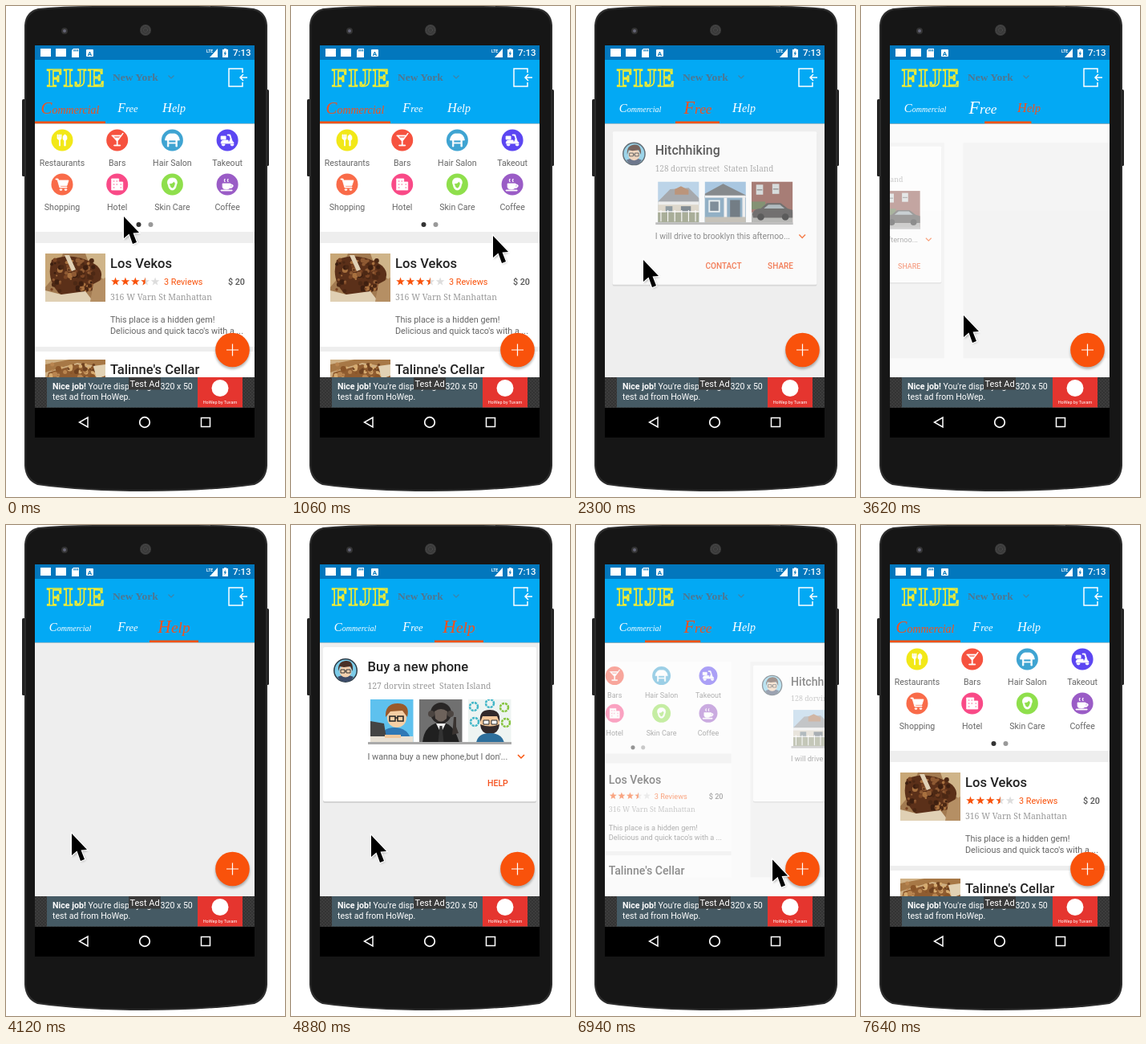
An HTML page that plays this animation: 348 px wide and 611 px high, repeating every 8680 ms.

```html
<!DOCTYPE html>
<html lang="en">
<head>
<meta charset="utf-8">
<style>
html, body { margin: 0; width: 100%; height: 100%; overflow: hidden; background: #fff; }
#stage { display: block; width: 348px; height: 611px; }
text { font-family: Roboto, sans-serif; font-size: 10.8px; white-space: pre; }
.title { font-size: 16.6px; font-weight: 500; fill: #222; }
.addr { font-family: "Noto Serif", serif; font-size: 10.4px; fill: #999; }
.body { fill: #666; }
.btn { font-size: 10.5px; font-weight: 500; fill: #f4511e; }
.cat { font-size: 10.6px; fill: #666; text-anchor: middle; }
.tab { font-family: "Liberation Serif", serif; font-style: italic; text-anchor: middle; }
.ad { font-size: 10.6px; fill: #fff; }
.line { fill: none; stroke: #fff; stroke-width: 1.2; }
.icon { fill: #fff; fill-rule: evenodd; stroke: #fff; stroke-width: .8; }
</style>
</head>
<body>
<svg id="stage" viewBox="0 0 348 611"></svg>
<script>
const ORANGE = '#f9520b';
const LEFT = 36, W = 274, TOP = 146.5, BOTTOM = 462, H = BOTTOM - TOP;
const stage = document.getElementById('stage');
const rect = (x, y, w, h, fill, more = '') =>
  `<rect x="${x}" y="${y}" width="${w}" height="${h}" fill="${fill}" ${more}/>`;
const band = (y, h, fill, more) => rect(LEFT, y, W, h, fill, more);
const circle = (x, y, r, fill, more = '') =>
  `<circle cx="${x}" cy="${y}" r="${r}" fill="${fill}" ${more}/>`;
const path = (d, fill, more = '') => `<path d="${d}" fill="${fill}" ${more}/>`;
const line = (d, more = '') => `<path d="${d}" class="line" ${more}/>`;
const text = (x, y, str, cls = '', more = '') =>
  `<text x="${x}" y="${y}" class="${cls}" ${more}>${str}</text>`;
const photo = (x, y, w, h, art) =>
  `<svg x="${x}" y="${y}" width="${w}" height="${h}">${art}</svg>`;

// ---- phone and bars ----
const phone =
  rect(20, 116, 5, 96, '#222', 'rx="1.5"') + rect(323, 104, 5, 95, '#222', 'rx="1.5"') +
  path('M23 24Q24 7 40 3Q70 0 110 0H238Q280 0 309 3Q325 7 326 24V572Q325 590 310 596' +
    'Q250 604 174 604T39 596Q24 590 23 572Z', '#2c2c2c') +
  path('M25 25Q26 9 41 5Q70 2 110 2H238Q280 2 308 5Q323 9 324 25V571Q323 588 309 594' +
    'Q250 602 174 602T40 594Q26 588 25 571Z', '#161616') +
  circle(174, 30, 7, '#3a3a3a') +
  circle(174, 30, 5.5, 'none', 'stroke="#555" stroke-dasharray="1 1"') +
  circle(174, 30, 2.5, 'none', 'stroke="#555" stroke-dasharray="1 1"') +
  circle(73, 31, 4, '#333') + circle(73, 31, 2, '#667');

const statusBar = band(49, 18, '#0277bd') +
  rect(43, 53, 13, 10, '#fff') + rect(62, 53, 13, 10, '#fff') +
  path('M84 53h7v11h-9v-9z', '#fff') + line('M85 54v2.5M87.2 54v2.5M89.4 54v2.5', 'style="stroke:#0277bd"') +
  rect(100, 54, 9, 9, '#fff', 'rx="1"') +
  text(104.5, 61.5, 'A', '', 'text-anchor="middle" style="font-size:8px;font-weight:700" fill="#0277bd"') +
  text(250, 57.5, 'LTE', '', 'fill="#fff" style="font-size:5px;font-weight:700"') +
  path('M254 64L264 53V64Z', '#fff') +
  path('M270 54h2v-1h3v1h2v10h-7z', '#fff') + path('M274 55.5l-2.5 4h1.5l-.5 3 2.5-4h-1.5z', '#0277bd') +
  text(283, 62, '7:13', '', 'fill="#fff" style="font-size:11.5px;font-weight:500"');

const appBar = band(67, TOP - 67, '#03a9f4') +
  text(51, 100, 'FIJE', '', `fill="#03a9f4" stroke="#f1ec34" stroke-width="1.7"
    style="font:bold 31px 'Liberation Serif',serif;letter-spacing:1.5px"`) +
  text(133, 93, 'New York', '', `fill="#4f7690"
    style="font:bold 13.5px 'Liberation Serif',serif"`) +
  path('M202.5 86.5l3.5 3.5 3.5-3.5', 'none', 'stroke="#3f83a8" stroke-width="1.2"') +
  line('M295 83V78H278V100H295V95M301 89H292M296 85l-4 4 4 4', 'style="stroke-width:1.5"');

const tabs = [
  { x: 80, left: 36, right: 124, first: 'C', rest: 'ommercial', size: [15, 10] },
  { x: 152, left: 124, right: 179, first: 'F', rest: 'ree', size: [16, 12.5] },
  { x: 209.5, left: 179, right: 240, first: 'H', rest: 'elp', size: [16.5, 14] }
];
const tabBar = tabs.map((t, i) => `<g id="tab${i}">` +
  text(t.x, 132, `<tspan font-size="${t.size[0]}">${t.first}</tspan><tspan font-size="${t.size[1]}">${t.rest}</tspan>`, 'tab') +
  '</g>').join('') + `<rect id="ink" y="143.5" height="3" fill="${ORANGE}"/>`;

// ---- first page ----
const cats = [
  ['Restaurants', '#f2e818', 'M-6-7h1v4h1v-4h1v4h1v-4h1v5l-1.5 2V7h-1V0L-6-2ZM3.5-7Q6.5-6 6-2Q5.500 0 4.200.5V7h-1.400V.5Q1.500 0 1-2Q.5-6 3.500-7Z'],
  ['Bars', '#f6523f', 'M-7-6H5L7-9 7.500-8.500 5.500-5.500.5 1V6H4V7H-4V6H-.5V1ZM-4.500-5L-3-3H2.500L4-5Z'],
  ['Hair Salon', '#3fa4d2', 'M-9 0Q-8-7-3-8H3Q8-7 9 0ZM-6 0h1.500V3h9V0H6V8H4.500V4h-9V8H-6Z'],
  ['Takeout', '#5c46f2', 'M-8-5h6v4h-6ZM-8 4Q-8 0-4 0H1V2H2.500L4-2 2.500-6H0V-7H3.500L6 1Q8 2 8 4H2.500ZM-7 5a2 2 0 1 0 4 0ZM4 5a2 2 0 1 0 4 0Z'],
  ['Shopping', '#f96b49', 'M-8-7h3l.6 2H8L6 1.500H-2.500L-2 3H6V4H-3L-6-6H-8ZM-3 6a1.400 1.400 0 1 0 3 0ZM3 6a1.400 1.400 0 1 0 3 0Z'],
  ['Hotel', '#f94a87', 'M-7 7V-7H2V-3H7V7ZM-5-5v2h2v-2ZM-1.500-5v2h2v-2ZM-5-1v2h2v-2ZM-1.500-1v2h2v-2ZM3.500-1v2h2v-2ZM-5 3v2h2v-2ZM3.500 3v2h2v-2Z'],
  ['Skin Care', '#8fdf4c', 'M-6-2Q-6-8 0-8T6-2L5 1Q4 7 0 7T-5 1ZM-4-1Q1-1 2-4L4-1 3 2Q2 5 0 5T-3 2Z'],
  ['Coffee', '#9a5cc6', 'M-6-1H4V0Q8 0 7 2.500T3 4.500Q1.500 6-1 6Q-6 6-6 3ZM4 1V3Q6 3 6 1ZM-8 7H6V8H-8ZM-3-3q-2-2 0-4q-1 2 0 4ZM1-3q-2-2 0-4q-1 2 0 4Z']
].map(([name, color, d], i) => {
  const x = 70 + 68.7 * (i % 4), y = i < 4 ? 167 : 222;
  return circle(x, y, 13.5, color) + `<path d="${d}" class="icon" transform="translate(${x} ${y})"/>` +
    text(x, y + 32, name, 'cat');
}).join('');

const starPoints = Array.from({ length: 10 }, (_, i) => {
  const r = i % 2 ? 2.3 : 5.6, a = i * Math.PI / 5;
  return `${(r * Math.sin(a)).toFixed(2)},${(-r * Math.cos(a)).toFixed(2)}`;
});
const star = (x, fill, pts = starPoints) =>
  `<polygon points="${pts.join(' ')}" transform="translate(${x} 343)" fill="${fill}"/>`;
const stars = [0, 1, 2, 3, 4].map(i => star(136.5 + 12.4 * i, i < 3 ? ORANGE : '#ddd')).join('') +
  star(173.7, ORANGE, [...starPoints.slice(5), starPoints[0]]);

// small seeded flecks of food inside a box
function flecks(count, x, y, w, h, colors) {
  let seed = 7;
  const rnd = () => (seed = seed * 16807 % 2147483647) / 2147483647;
  return Array.from({ length: count }, () =>
    circle((x + w * rnd()).toFixed(1), (y + h * rnd()).toFixed(1), (1 + 2.5 * rnd()).toFixed(1),
      colors[Math.floor(rnd() * colors.length)])).join('');
}
const tacoArt = rect(0, 0, 75, 60, '#a27a50') + path('M0 0H22L10 30 0 42Z', '#c8a777') +
  path('M50 0H75V34L58 22Z', '#cfb489') + path('M8 8Q30-2 56 10T60 46L20 52Q0 34 8 8Z', '#5b3019') +
  flecks(90, 8, 8, 52, 40, ['#3d1f10', '#7a4524', '#8f5a33', '#4c2814', '#a8713f']) +
  path('M24 2l6 0 8 18-5 2ZM0 46l20 5 30-4 10 13H0Z', '#e0d0b4') + path('M60 38l15-8V60H56Z', '#b58f64');
const cellarArt = rect(0, 0, 75, 60, '#cfb084') + path('M0 6L30 0H75V10L40 4 0 16Z', '#a77846') +
  path('M4 16L40 6 75 18V30H0Z', '#8f5c30') +
  flecks(50, 4, 6, 62, 18, ['#b98550', '#6f4220', '#d6ab70', '#8a5528']) + path('M60 8l15-2V20L64 24Z', '#e2d2b4');

const commercial = band(TOP, H, '#fff') + cats +
  circle(165.5, 272, 3, '#333') + circle(180.5, 272, 3, '#999') +
  band(281, 14, '#eee') + photo(49, 308, 75, 60, tacoArt) +
  text(130, 325.5, 'Los Vekos', 'title') + stars +
  text(197, 347, '3 Reviews', '', `fill="${ORANGE}"`) +
  text(298, 347, '$ 20', '', 'text-anchor="end" fill="#555" style="font-weight:500"') +
  text(130, 366, '316 W Varn St Manhattan', 'addr') +
  text(130, 393.5, 'This place is a hidden gem!', 'body') +
  text(130, 408, "Delicious and quick taco's with a ...", 'body') +
  band(424, 6, '#eee') + photo(49, 440, 75, 60, cellarArt) +
  text(130, 457.5, "Talinne's Cellar", 'title');

// ---- card pages ----
const avatar = circle(68, 181, 15, '#2b3a45') + circle(68, 181, 13.5, '#7ccbe8') +
  path('M58 189q10-5 20 0l-3 4q-7 4-14 0Z', '#3c4a68') + circle(68, 182, 7.5, '#f3cfae') +
  path('M59 182Q58 170 68 169T77 182L74 176 66 177 61 176Z', '#4a3026') +
  path('M62 180h5v4h-5zM69 180h5v4h-5zM67 182h2', 'none', 'stroke="#333"');

const house = rect(0, 0, 54, 54, '#a9cbe6') + path('M0 26L16 10 40 8 54 22V30H0Z', '#8b8f94') +
  path('M22 10l8-4 10 5v6H22z', '#a8734f') + rect(0, 29, 54, 17, '#d8d0bf') +
  rect(0, 26, 54, 4, '#eee') + rect(10, 32, 9, 14, '#6b7b83') + rect(30, 32, 13, 10, '#59656e') +
  rect(0, 40, 54, 14, '#8f9578') + line('M0 39H54M4 37V52M13 37V52M22 37V52M31 37V52M40 37V52M49 37V52');
const porch = rect(0, 0, 54, 54, '#8fb9dc') + path('M0 16L24 3 54 18V22H0Z', '#5e6468') +
  rect(0, 19, 54, 35, '#6f98b5') + rect(5, 24, 15, 16, '#e8eef0') + rect(7, 26, 11, 12, '#55697a') +
  rect(25, 21, 4, 33, '#f3f3f3') + rect(33, 24, 13, 30, '#43525d') + rect(49, 20, 4, 34, '#eee') +
  rect(0, 46, 54, 8, '#b7b2a5') + rect(0, 18, 54, 3, '#f0f0f0');
const car = rect(0, 0, 54, 54, '#8c5148') + rect(6, 4, 9, 13, '#cfd5d6') + rect(27, 3, 9, 13, '#cfd5d6') +
  rect(7, 10, 7, 1.5, '#777') + rect(28, 9, 7, 1.5, '#777') + rect(0, 26, 18, 10, '#5b6e45') +
  rect(0, 40, 54, 14, '#a3a3a1') + path('M1 42Q3 35 12 35L20 28H38L47 35 54 37V47H2Z', '#42403f') +
  path('M16 35l6-5h15l6 5z', '#9aa7ad') + circle(12, 46, 4.5, '#222') + circle(44, 46, 4.5, '#222');
const coder = rect(0, 0, 54, 54, '#5ec1ee') + path('M12 54Q12 35 30 35T52 54Z', '#2f78b5') +
  circle(33, 23, 12, '#f5cfa5') + path('M19 22Q18 5 34 5T46 22L40 14 25 15Z', '#9a5a2b') +
  path('M24 21h7v6h-7zM34 21h7v6h-7zM31 23h3', 'none', 'stroke="#222" stroke-width="1.5"') +
  path('M0 27l17 3 3 18H0Z', '#444') + rect(0, 46, 54, 8, '#e7e0d4') + rect(18, 44, 20, 4, '#f1c79b');
const ape = rect(0, 0, 54, 54, '#707070') + path('M4 54Q6 32 24 29T50 54Z', '#202020') +
  path('M21 30l6 12 6-12z', '#eee') + path('M25.5 33h3l2 21h-7z', '#333') +
  circle(27, 17, 13, '#292625') + circle(15, 18, 4, '#4c4541') + circle(39, 18, 4, '#4c4541') +
  path('M19 15Q27 9 35 15L34 24Q27 31 20 24Z', '#6d625b') + path('M42 34l1-12h3v12l3 8-8 2z', '#3a3431');
const ideas = rect(0, 0, 54, 54, '#eef4f2') +
  [[7, 9], [45, 10], [8, 28], [47, 29], [27, 5]].map(([x, y], i) =>
    circle(x, y, 5, 'none', `stroke="${['#43b7c8', '#86c440'][i % 2]}" stroke-width="2.5" stroke-dasharray="3 1"`)).join('') +
  circle(27, 29, 12, '#f3c79a') + path('M15 28Q13 13 27 13T39 28L36 21H18Z', '#32292a') +
  path('M15 31q12 5 24 0Q38 43 27 43T15 31Z', '#32292a') + path('M10 54Q12 42 27 42T45 54Z', '#2d6f9c') +
  path('M19 26h7v5h-7zM29 26h7v5h-7z', '#fff', 'stroke="#222"');

const cardPage = (i, h, title, addr, arts, msg, buttons) => band(TOP, H, '#eee') +
  `<g id="card${i}">` + rect(40, 153, 266, h + 0.8, '#cfcfcf', 'rx="2"') + rect(40, 152, 266, h, '#fff', 'rx="2"') +
  avatar + text(95.5, 182, title, 'title') + text(95.5, 204, addr, 'addr') +
  arts.map((a, k) => photo(99 + 61 * k, 217, 53.5, 53, a)).join('') + rect(96, 270, 179, 3, '#aaa') +
  text(95.5, 292, msg, 'body') +
  path('M283 286l4 4 4-4', 'none', `stroke="${ORANGE}" stroke-width="1.5"`) + buttons + '</g>';

const free = cardPage(1, 199, 'Hitchhiking', '128 dorvin street  Staten Island', [house, porch, car],
  'I will drive to brooklyn this afternoo...',
  text(161, 330.5, 'CONTACT', 'btn') + text(242, 330.5, 'SHARE', 'btn'));
const help = cardPage(2, 192, 'Buy a new phone', '127 dorvin street  Staten Island', [coder, ape, ideas],
  "I wanna buy a new phone,but I don'...", text(245, 324.5, 'HELP', 'btn'));

// ---- overlays ----
const fab = circle(282.5, 430.5, 21.5, '#000', 'opacity=".28" filter="url(#soft)"') +
  circle(282.5, 428, 21.3, ORANGE) + line('M275 428H290M282.5 420.5V435.5');
const ad = band(BOTTOM, 38, '#333') + band(BOTTOM, 38, 'url(#mesh)') +
  rect(51, BOTTOM, 244, 37.5, '#455a64') + rect(239, BOTTOM, 56, 37.5, '#e5352f') +
  text(58, 477, '<tspan font-weight="700">Nice job!</tspan> You\'re displaying a 320 x 50', 'ad') +
  text(58, 490, 'test ad from HoWep.', 'ad') +
  circle(267, 475.5, 10.5, '#fff') +
  text(267, 495, 'HoWep by Tuvarn', '', 'fill="#fff" text-anchor="middle" style="font-size:5.5px"') +
  rect(153, BOTTOM, 40, 15.5, '#3a3a3a') + text(173, 473.5, 'Test Ad', '', 'fill="#fff" text-anchor="middle" style="font-size:11px"');
const navBar = band(500, 37, '#000') +
  line('M102 512V524L91.5 518ZM243.5 512.5H254.5V523.5H243.5Z', 'style="stroke-width:1.5"') +
  circle(173, 518, 6.3, 'none', 'stroke="#fff" stroke-width="1.7"');
const arrow = '<g id="cursor"><path d="M1 2V29L7.5 23.5 12 35 17 33 12.5 22 20 21.5Z" opacity=".35" filter="url(#soft)"/>' +
  path('M0 0V27L6.5 21.5L11 34L16 32L11.5 20.5L19 20Z', '#000', 'stroke="#fff" stroke-width="2.4" paint-order="stroke"') + '</g>';

stage.innerHTML = `<defs><clipPath id="view">${band(TOP, H, '#000')}</clipPath>
  <filter id="soft" x="-30%" y="-30%" width="160%" height="160%"><feGaussianBlur stdDeviation="1.8"/></filter>
  <pattern id="mesh" width="4" height="4" patternUnits="userSpaceOnUse">${circle(1, 1, 0.8, '#484848')}${circle(3, 3, 0.8, '#484848')}</pattern></defs>` +
  phone + statusBar + appBar + tabBar + band(TOP, H, '#fafafa') +
  '<g clip-path="url(#view)">' + [commercial, free, help].map((p, i) => `<g id="page${i}">${p}</g>`).join('') + '</g>' +
  fab + ad + navBar + arrow;

// ---- motion ----
const LOOP = 8680;
const swipes = [[1280, 0, 1], [3360, 1, 2], [5080, 2, 1], [6720, 1, 0]];
const cardIn = [, [2160, 252], [4240, 248.5]];
const track = [[0, 147, 262], [560, 147, 262], [1060, 252, 286], [1280, 252, 286], [1640, 92, 312],
  [2160, 84, 316], [2300, 84, 316], [2860, 301, 388], [3020, 293, 387], [3160, 281, 386], [3360, 281, 386],
  [3620, 128, 385], [4000, 82, 384], [4300, 82, 384], [4860, 100, 386], [5080, 100, 386], [5480, 353, 400],
  [6000, 353, 420], [6540, 114, 411], [6720, 114, 411], [7100, 325, 420], [7580, 118, 224],
  [7620, 10, 92], [7640, -60, 0], [LOOP, -60, 0]];

const el = id => document.getElementById(id);
const clamp = v => Math.max(0, Math.min(1, v));
const smooth = v => v * v * (3 - 2 * v);
const mix = (a, b, k) => a + (b - a) * k;
const scaleAt = (node, x, y, s, dx = 0) =>
  node.setAttribute('transform', `translate(${x + dx} ${y}) scale(${s}) translate(${-x} ${-y})`);

// pages shrink to 85% and fade to half while off centre
function placePage(i, pos) {
  const p = i - pos, page = el('page' + i), s = Math.max(0.85, 1 - Math.abs(p));
  page.style.display = Math.abs(p) < 0.999 ? '' : 'none';
  const shift = (W - H / 2) * (1 - s) / 2;
  scaleAt(page, LEFT + W / 2, (TOP + BOTTOM) / 2, s, W * p - Math.sign(p) * shift);
  page.setAttribute('opacity', 0.5 + (s - 0.85) / 0.15 * 0.5);
}

function draw(t) {
  const [start, from, to] = swipes.filter(s => s[0] <= t).pop() || [-9999, 0, 0];
  const age = t - start;
  const slide = Math.sin(Math.PI / 2 * clamp(age / 520));
  const ink = Math.pow(slide, 1.75);
  const grow = smooth(clamp((age - 440) / 200));
  const chosen = age >= 250 ? to : from;

  tabs.forEach((tab, i) => {
    placePage(i, mix(from, to, slide));
    const size = mix(+(i === from), +(i === to), grow);
    scaleAt(el('tab' + i), tab.x, 128, 1 + 0.39 * size);
    el('tab' + i).setAttribute('fill', i === chosen ? '#f4511e' : '#fff');
    if (!cardIn[i]) return;
    const k = 1 - (1 - clamp((t - cardIn[i][0]) / 300)) ** 2;
    scaleAt(el('card' + i), 173, cardIn[i][1], 0.85 + 0.15 * k);
    el('card' + i).setAttribute('opacity', k);
  });
  const left = mix(tabs[from].left, tabs[to].left, ink);
  el('ink').setAttribute('x', left);
  el('ink').setAttribute('width', mix(tabs[from].right, tabs[to].right, ink) - left);

  const n = track.findIndex(k => k[0] > t), a = track[n - 1], b = track[n];
  const k = smooth((t - a[0]) / (b[0] - a[0]));
  el('cursor').setAttribute('transform', `translate(${mix(a[1], b[1], k)} ${mix(a[2], b[2], k)})`);
}

const begin = performance.now();
function tick() {
  draw((performance.now() - begin) % LOOP);
  requestAnimationFrame(tick);
}
tick();
</script>
</body>
</html>
```
